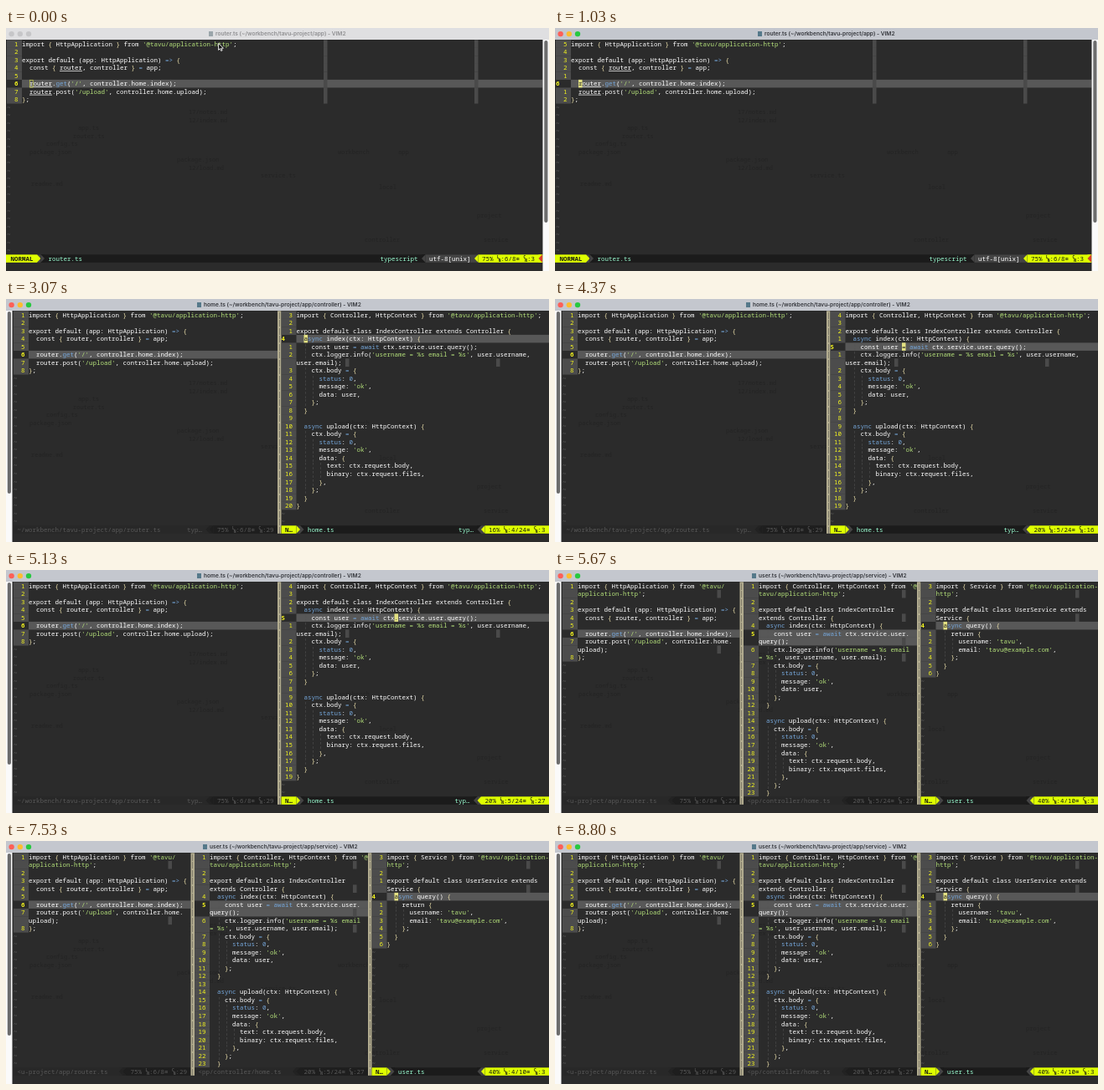
Animation of 648x291 px, one loop 8.83 s. Source, as an HTML page with a canvas:

```html
<!DOCTYPE html>
<html lang="en">
<head>
<meta charset="utf-8">
<title>Editor: jump to definition</title>
<style>
html, body { margin: 0; width: 100%; height: 100%; overflow: hidden; background: #2b2b2b; }
canvas { display: block; width: 648px; height: 291px; }
</style>
</head>
<body>
<canvas id="stage"></canvas>
<script>
const W = 648, H = 291, LOOP = 8830;
const CW = 4.5, RH = 9.52, TOP = 14.3, ROWS = 27, GUTTER = 4;
const MONO = '"Noto Sans Mono", "DejaVu Sans Mono", monospace';
const C = {
  bg: '#2b2b2b', text: '#ffffff', string: '#b4e07a', blue: '#74a5d8', brace: '#efe3ae',
  number: '#f4f51e', gutter: '#4c4c4c', line: '#585858', rule: '#4a4a4a', guide: '#555555',
  tilde: '#626262', lime: '#dfff00', grey: '#444444', bar: '#1b1b1b', mint: '#9cffd3',
  dimText: '#585858', dimBar: '#282828', dimBlock: '#1e1e1e', track: '#fafafa', thumb: '#6c6c6c',
  split: '#b3ad90', splitMark: '#55524a', ghost: '#242424'
};

const files = {
  router: `import { HttpApplication } from '@tavu/application-http';

export default (app: HttpApplication) => {
  const { router, controller } = app;

  router.get('/', controller.home.index);
  router.post('/upload', controller.home.upload);
};`,
  home: `import { Controller, HttpContext } from '@tavu/application-http';

export default class IndexController extends Controller {
  async index(ctx: HttpContext) {
    const user = await ctx.service.user.query();
    ctx.logger.info('username = %s email = %s', user.username, user.email);
    ctx.body = {
      status: 0,
      message: 'ok',
      data: user,
    };
  }

  async upload(ctx: HttpContext) {
    ctx.body = {
      status: 0,
      message: 'ok',
      data: {
        text: ctx.request.body,
        binary: ctx.request.files,
      },
    };
  }
}`,
  user: `import { Service } from '@tavu/application-http';

export default class UserService extends Service {
  async query() {
    return {
      username: 'tavu',
      email: 'tavu@example.com',
    };
  }
}`
};
for (const k in files) files[k] = files[k].split('\n');

const FOCUS = 600, POINTER_GONE = 1000;
// time, file, line, column
const moves = [
  [0, 'router', 6, 3], [1200, 'router', 6, 9], [1440, 'router', 6, 10],
  [1680, 'router', 6, 13], [1950, 'router', 6, 19], [2400, 'router', 6, 29],
  [2820, 'home', 4, 3], [3780, 'home', 5, 3], [3990, 'home', 5, 5],
  [4140, 'home', 5, 11], [4290, 'home', 5, 16], [4560, 'home', 5, 18],
  [4740, 'home', 5, 24], [4920, 'home', 5, 27], [5500, 'user', 4, 3]
];
// file, first column, width in columns, status name
const layouts = {
  router: [['router', 0, 142, 'router.ts']],
  home: [['router', 0, 70, '~/workbench/tavu-project/app/router.ts'], ['home', 71, 71, 'home.ts']],
  user: [['router', 0, 47, '<u-project/app/router.ts'], ['home', 48, 46, '<pp/controller/home.ts'],
         ['user', 95, 47, 'user.ts']]
};
const titles = {
  router: [250, 'router.ts (~/workbench/tavu-project/app) - VIM2'],
  home: [236, 'home.ts (~/workbench/tavu-project/app/controller) - VIM2'],
  user: [243, 'user.ts (~/workbench/tavu-project/app/service) - VIM2']
};
// faint text showing through the window
const ghosts = [
  [218, 100, '17/notes.md'], [218, 110, '12/index.md'], [86, 119, 'app.ts'], [80, 129, 'router.ts'],
  [48, 138, 'config.ts'], [28, 148, 'package.json'], [204, 157, 'package.json'], [218, 167, '12/load.md'],
  [304, 176, 'service.ts'], [30, 186, 'readme.md'], [396, 148, 'workbench'], [468, 148, 'app'],
  [445, 190, 'local'], [562, 224, 'project'], [428, 253, 'controller'], [570, 253, 'service']
];

const canvas = document.getElementById('stage');
const g = canvas.getContext('2d');
const dpr = window.devicePixelRatio || 1;
canvas.width = W * dpr;
canvas.height = H * dpr;
g.scale(dpr, dpr);

const rowY = r => TOP + r * RH;

function box(x, y, w, h, color) {
  g.fillStyle = color;
  g.fillRect(x, y, w, h);
}

function pill(x, y, w, h, color) {
  g.fillStyle = color;
  g.beginPath();
  g.roundRect(x, y, w, h, w / 2);
  g.fill();
}

function put(s, x, row, color, weight = 500) {
  g.font = `${weight} 7.5px ${MONO}`;
  g.fillStyle = color;
  g.fillText(s, x, rowY(row) + 7.3);
}

function arrow(x, row, dir, color, back) {
  const y = rowY(row), a = dir > 0 ? x : x + CW, b = dir > 0 ? x + CW : x;
  box(x, y, CW, RH, back);
  g.fillStyle = color;
  g.beginPath();
  g.moveTo(a, y);
  g.lineTo(b, y + RH / 2);
  g.lineTo(a, y + RH);
  g.fill();
}

function colorsOf(line) {
  const out = Array(line.length).fill(C.text);
  for (const m of line.matchAll(/'[^']*'|[{}]|=>?|\b(?:async|await|status|get|0)\b/g)) {
    const first = m[0][0];
    const color = first === "'" ? C.string : '{}'.includes(first) ? C.brace : C.blue;
    out.fill(color, m.index, m.index + m[0].length);
  }
  return out;
}

// break after the last allowed character that fits
function wrap(line, width) {
  const parts = [];
  let from = 0;
  while (line.length - from > width) {
    let end = from + width;
    while (end > from + 1 && !' @-;:,./'.includes(line[end - 1])) end--;
    parts.push([from, end]);
    from = end;
  }
  parts.push([from, line.length]);
  return parts;
}

function drawRuns(line, colors, from, to, x, row) {
  for (let i = from; i < to;) {
    let j = i + 1;
    while (j < to && colors[j] === colors[i]) j++;
    put(line.slice(i, j), x + (i - from) * CW, row, colors[i]);
    i = j;
  }
}

function drawCursor(x, row, ch, focused) {
  const y = rowY(row);
  if (focused) {
    box(x, y, CW, RH, '#e3e182');
    put(ch, x, row, '#222');
  } else {
    g.strokeStyle = '#c9d04a';
    g.lineWidth = 0.7;
    g.strokeRect(x + 0.3, y + 0.4, CW - 0.6, RH - 0.8);
  }
}

function drawBuffer(win, x, right) {
  const { lines, width, line: at, col, active, focused, marked } = win;
  const tx = x + GUTTER * CW, room = width - GUTTER;
  let row = 0;
  lines.forEach((line, n) => {
    const colors = colorsOf(line), current = n + 1 === at;
    const indent = line.search(/\S/);
    wrap(line, room).forEach(([from, to], part) => {
      if (row >= ROWS) return;
      const y = rowY(row);
      if (current) box(tx, y, right - tx, RH, C.line);
      else box(x, y, GUTTER * CW, RH + 0.1, C.gutter);
      for (const mark of [80, 120]) {
        const c = mark - part * room;
        if (c >= 0 && c < room) box(tx + c * CW, y, CW, RH + 0.1, C.rule);
      }
      if (!part) {
        const rel = active && focused;
        const label = rel && !current ? String(Math.abs(n + 1 - at)) : String(n + 1);
        const lx = rel && current ? x : x + (3 - label.length) * CW;
        put(label, lx, row, C.number, current ? 700 : 500);
        for (let k = 2; k < indent; k += 2) put('¦', tx + k * CW, row, C.guide, 400);
      }
      drawRuns(line, colors, from, to, tx, row);
      if (marked)
        for (const m of line.matchAll(/\brouter\b/g))
          box(tx + m.index * CW, y + RH - 1.2, 6 * CW, 0.7, C.text);
      if (active && current && col > from && col <= to)
        drawCursor(tx + (col - 1 - from) * CW, row, line[col - 1], focused);
      row++;
    });
  });
  for (; row < ROWS; row++) put('~', x, row, C.tilde, 400);
}

// small two-letter position mark in one cell
function posMark(x, a, color) {
  const y = rowY(ROWS);
  g.fillStyle = color;
  g.font = `700 4.5px ${MONO}`;
  g.fillText(a, x, y + 4.6);
  g.fillText('N', x + 1.7, y + 8.2);
}

function drawPosition(s, x, color, weight) {
  const [head, mid, tail] = s.split(/[LC]/);
  put(head, x, ROWS, color, weight);
  x += head.length * CW;
  posMark(x, 'L', color);
  put(mid, x + CW, ROWS, color, weight);
  x += (1 + mid.length) * CW;
  posMark(x, 'C', color);
  put(tail, x + CW, ROWS, color, weight);
}

function drawStatus(win, x, right) {
  const { lines, width, line, col, active, name, wide, count } = win;
  const y = rowY(ROWS), at = c => x + c * CW;
  const pos = `${Math.floor(100 * line / lines.length)}% L:${line}/${lines.length}≡ C:${col}`;
  const p = width - pos.length - (wide ? 2 : 1);
  const fg = active ? C.mint : C.dimText;
  const back = active ? C.bar : C.dimBar;
  const block = active ? C.lime : C.dimBlock;
  box(x, y, right - x, RH, back);

  if (active) {
    const mode = wide ? ' NORMAL ' : ' N… ', m = mode.length;
    box(x - (wide ? 1 : 0), y, m * CW + (wide ? 1 : 0), RH, C.lime);
    put(mode, x, ROWS, '#1c1c10', 700);
    arrow(at(m), ROWS, 1, C.lime, C.grey);
    arrow(at(m + 1), ROWS, 1, C.grey, back);
    put(name, at(m + 3), ROWS, fg);
  } else {
    put(name, at(1), ROWS, fg, 400);
  }

  box(at(p - 1), y, right - at(p - 1), RH, block);
  if (wide) {
    const u = p - 14;
    put('typescript', at(u - 13), ROWS, fg);
    arrow(at(u - 2), ROWS, -1, C.grey, back);
    box(at(u - 1), y, 13 * CW, RH, C.grey);
    put('utf-8[unix]', at(u), ROWS, '#fff');
    arrow(at(p - 2), ROWS, -1, C.lime, C.grey);
    arrow(at(width - 1), ROWS, -1, '#d8402c', C.lime);
  } else {
    if (count < 3) put('typ…', at(p - 8), ROWS, fg, active ? 500 : 400);
    arrow(at(p - 3), ROWS, -1, active ? C.grey : '#222', back);
    arrow(at(p - 2), ROWS, -1, block, active ? C.grey : '#222');
  }
  drawPosition(pos, at(p), active ? '#1c1c10' : C.dimText, active ? 500 : 400);
}

function drawTitle(file, focused) {
  const [x, s] = titles[file];
  box(0, 0, W, 14, focused ? '#c4c7ce' : '#dfdfe1');
  ['#fe5f57', '#febc2e', '#28c840'].forEach((color, i) =>
    pill(3.4 + i * 10.2, 3.9, 6.4, 6.4, focused ? color : '#c6c6c8'));
  box(x - 8, 4, 5, 6, focused ? '#55798a' : '#9aa5aa');
  g.font = '600 6.6px Inter, "Open Sans", sans-serif';
  g.fillStyle = focused ? '#33353a' : '#8e8e90';
  g.fillText(s, x, 9.4);
}

function drawPointer() {
  const pts = [[0, 0], [0, 8], [1.9, 6.3], [3.1, 9], [4.5, 8.4], [3.3, 5.8], [5.8, 5.7]];
  g.beginPath();
  pts.forEach(([x, y]) => g.lineTo(253.6 + x, 18.4 + y));
  g.closePath();
  g.fillStyle = '#111';
  g.strokeStyle = '#fff';
  g.lineWidth = 0.9;
  g.fill();
  g.stroke();
}

function drawSeparator(x) {
  box(x, TOP, CW, (ROWS + 1) * RH, C.split);
  for (let r = 0; r <= ROWS; r++) put('|', x, r, C.splitMark);
}

function draw(t) {
  const past = moves.filter(m => m[0] <= t);
  const file = past[past.length - 1][1];
  const layout = layouts[file], count = layout.length, wide = count === 1;
  const left = wide ? 1 : 9, edge = wide ? 640.5 : W;
  const focused = t >= FOCUS;

  box(0, 0, W, H, C.bg);
  g.font = `400 7px ${MONO}`;
  g.fillStyle = C.ghost;
  ghosts.forEach(([x, y, s]) => g.fillText(s, x, y + 2.5));

  layout.forEach(([key, start, width, name], i) => {
    const x = left + start * CW, last = i === count - 1;
    const right = last ? edge : x + width * CW;
    const [, , line, col] = past.filter(m => m[1] === key).pop();
    const win = { lines: files[key], width, line, col, name, wide, count, focused,
                  active: key === file, marked: t < moves[1][0] };
    drawBuffer(win, x, right);
    drawStatus(win, x, right);
    if (!last) drawSeparator(right);
  });

  const track = wide ? 640.5 : 0;
  box(track, 14, 7.5, H - 14, C.track);
  pill(track + 1.8, 15, 4.2, 218, C.thumb);
  drawTitle(file, focused);
  if (t < POINTER_GONE) drawPointer();
}

const start = performance.now();
function tick() {
  draw((performance.now() - start) % LOOP);
  requestAnimationFrame(tick);
}
tick();
</script>
</body>
</html>
```
